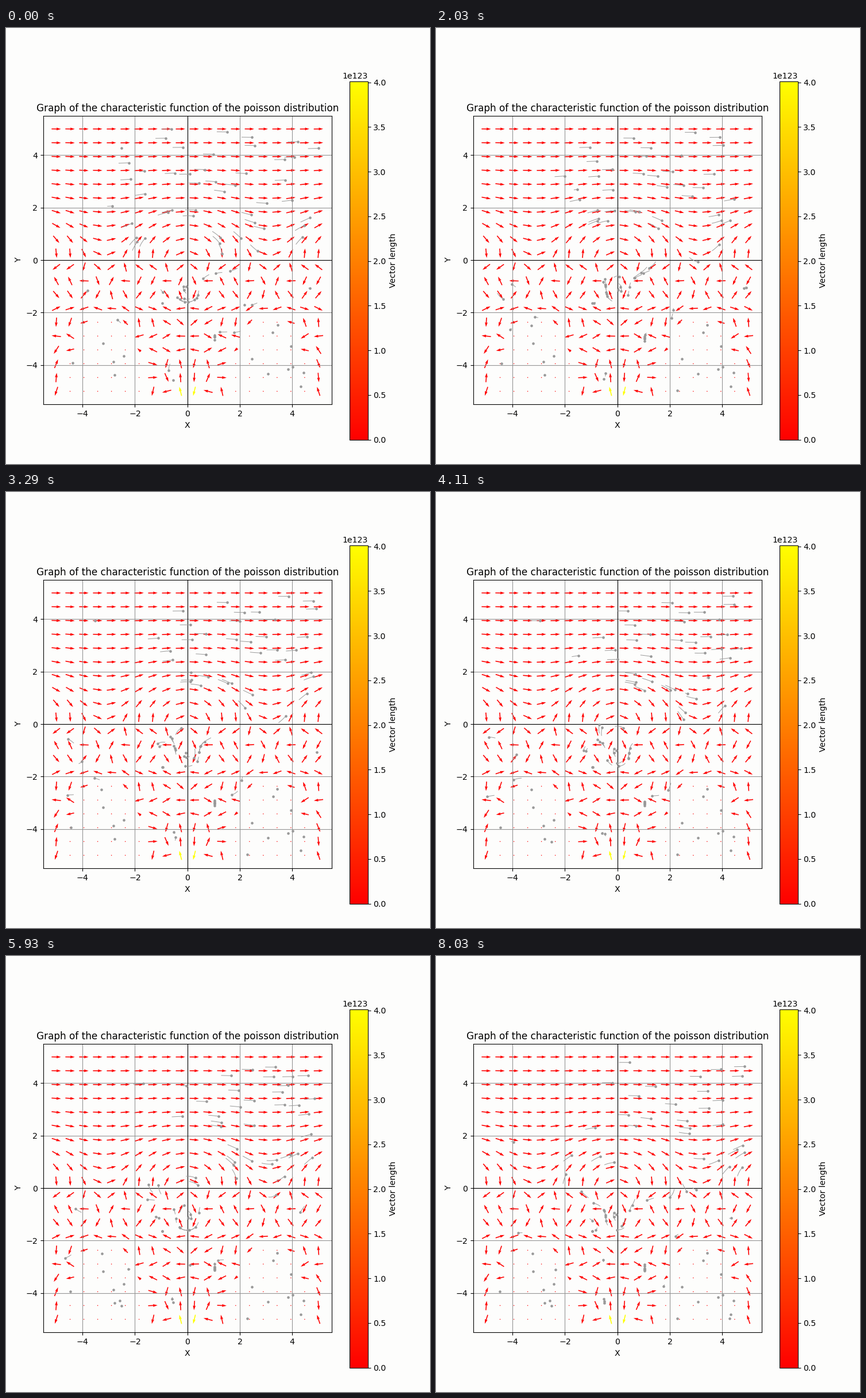
Write a matplotlib script that moves like this. It is 738x759 px and loops after 8.05 s.

```python
import matplotlib.pyplot as plt
import numpy as np
from matplotlib.animation import FuncAnimation
from matplotlib.collections import LineCollection

W, H, DPI = 738, 759, 100
LOOP, INTERVAL = 8050, 35
RATE = 2            # Poisson parameter
LIMIT = 5           # half-width of the sampled square
NODES = 20
COUNT = 90          # particles
STEP = 0.03297      # distance per step at unit speed
TAIL = 12           # trail length in steps
WARMUP = 110        # steps run before the loop begins
STEPS = 180
PAPER, GREY = "#fdfdfc", "#999999"

plt.rcParams.update({"font.family": "DejaVu Sans", "font.size": 10.13,
                     "axes.facecolor": PAPER, "figure.facecolor": PAPER})

axis = np.linspace(-LIMIT, LIMIT, NODES)
X, Y = np.meshgrid(axis, axis)
value = np.conj(np.exp(RATE * (np.exp(1j * (X + 1j * Y)) - 1)))
length = np.abs(value)
field = value / (length + 1e-8)


def flow(p):
    """Bilinear interpolation of the unit field at complex points."""
    gx, gy = ((np.clip(c, -LIMIT, LIMIT) + LIMIT) * (NODES - 1) / (2 * LIMIT)
              for c in (p.real, p.imag))
    i, j = (np.minimum(g.astype(int), NODES - 2) for g in (gx, gy))
    a, b = gx - i, gy - j
    low = field[j, i] * (1 - a) + field[j, i + 1] * a
    high = field[j + 1, i] * (1 - a) + field[j + 1, i + 1] * a
    return low * (1 - b) + high * b


def simulate():
    """Positions and birth steps; a particle that leaves restarts anywhere."""
    rng = np.random.default_rng(4)

    def scatter(n):
        return rng.uniform(-LIMIT, LIMIT, n) + 1j * rng.uniform(-LIMIT, LIMIT, n)

    p, born = scatter(COUNT), np.zeros(COUNT, int)
    places, births = [], []
    for n in range(WARMUP + STEPS):
        places.append(p)
        births.append(born.copy())
        p = p + STEP * flow(p + STEP / 2 * flow(p))
        gone = np.maximum(abs(p.real), abs(p.imag)) > LIMIT
        p[gone] = scatter(gone.sum())
        born[gone] = n + 1
    places = np.array(places)
    return np.stack([places.real, places.imag], axis=-1), births


places, births = simulate()


def step_at(t):
    """Simulation step on show at t ms: two short holds, then a long one."""
    k, rest = divmod(t - 30, 140)
    return 4 + 3 * k + min(rest // 20, 2)


def box(left, top, right, bottom):
    return [left / W, 1 - bottom / H, (right - left) / W, (bottom - top) / H]


fig = plt.figure(figsize=(W / DPI, H / DPI), dpi=DPI)
ax = fig.add_axes(box(64.7, 152.9, 566.7, 655.3))
ax.set(xlim=(-5.5, 5.5), ylim=(-5.5, 5.5), xlabel="X", ylabel="Y",
       xticks=range(-4, 5, 2), yticks=range(-4, 5, 2))
ax.set_title("Graph of the characteristic function of the poisson distribution")
ax.grid(True, color="#949494", linewidth=0.8)
ax.axhline(0, color="black", linewidth=0.8)
ax.axvline(0, color="black", linewidth=0.8)

arrows = ax.quiver(X, Y, field.real, field.imag, length,
                   cmap="autumn", pivot="mid", width=0.0032)
fig.colorbar(arrows, cax=fig.add_axes(box(597.9, 92.6, 629.6, 716.5)),
             label="Vector length")

trails = LineCollection([], colors=GREY, linewidths=0.7, zorder=2.1)
ax.add_collection(trails, autolim=False)
dots, = ax.plot([], [], "o", color=GREY, markersize=3.3,
                markeredgewidth=0, zorder=2.2)


def update(i):
    # each slot shows the state reached by its end
    n = WARMUP + step_at(i * INTERVAL + 30)
    starts = np.maximum(births[n], n - TAIL)
    trails.set_segments([places[s:n + 1, k] for k, s in enumerate(starts)])
    dots.set_data(*places[n].T)
    return trails, dots


anim = FuncAnimation(fig, update, frames=LOOP // INTERVAL, interval=INTERVAL,
                     repeat=True, repeat_delay=0)
plt.show()
```
